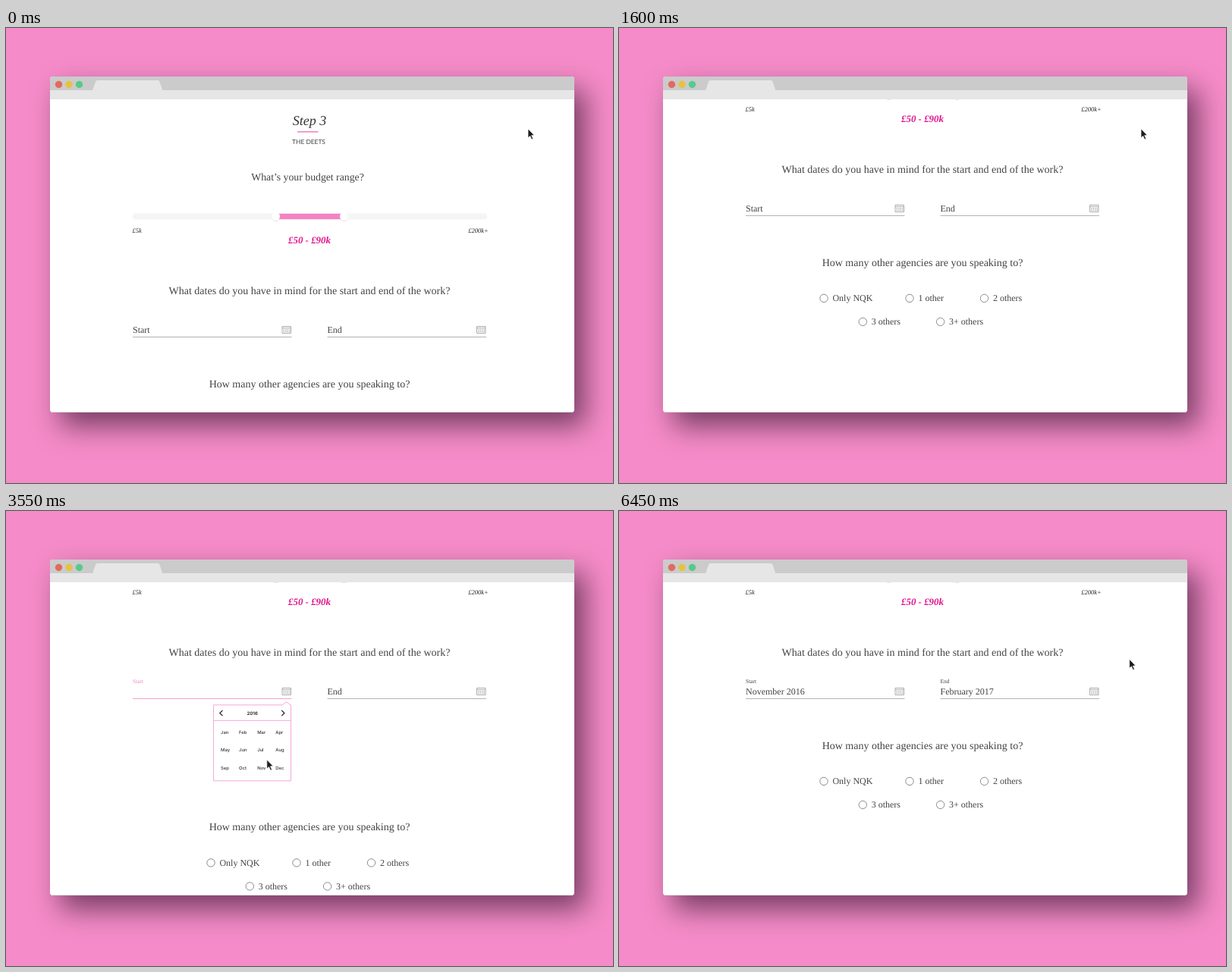
Animation of 800x600 px, one loop 7950 ms. Source, as an HTML page:

```html
<!DOCTYPE html>
<html lang="en">
<head>
<meta charset="utf-8">
<title>Budget and dates form</title>
<style>
  html, body { margin: 0; width: 100%; height: 100%; overflow: hidden; background: #f58bc8; }
  .window {
    position: absolute; left: 58px; top: 64px; width: 691px; height: 443px;
    border-radius: 4px; background: #fff;
    box-shadow: 14px 18px 36px rgba(20, 0, 20, .56);
  }
  svg { position: absolute; left: 0; top: 0; }
  text { font-family: "Liberation Serif", serif; fill: #444; text-rendering: geometricPrecision; }
  .mid { text-anchor: middle; }
  .step { font-size: 18px; font-style: italic; fill: #333; }
  .sub { font: 8.4px Lato, sans-serif; }
  .ask { font-size: 14px; }
  .item { font-size: 12px; }
  .label { font-size: 7.5px; }
  .limit { font-size: 8.5px; font-style: italic; fill: #222; }
  .range { font-size: 12.9px; font-style: italic; font-weight: bold; fill: #e2128c; }
  .month { font: 500 5.9px Inter, sans-serif; fill: #333; }
  .year { font: 700 6.1px Inter, sans-serif; fill: #333; }
  .rule { stroke: #b3b3b3; }
  .active .rule { stroke: #f3a0d0; }
  .active .label { fill: #f284c4; }
  .picker { fill: #fff; stroke: #f3a9d4; }
  .chevron { fill: none; stroke: #222; stroke-width: 1.2; }
  .icon { fill: none; stroke: #a3a3a3; stroke-width: .9; }
</style>
</head>
<body>
<div class="window"></div>
<svg width="800" height="600" viewBox="0 0 800 600">
  <defs>
    <clipPath id="view"><rect x="58" y="94" width="691" height="412"/></clipPath>
    <filter id="soft" x="-50%" y="-50%" width="200%" height="200%">
      <feDropShadow dx="0" dy=".5" stdDeviation=".7" flood-opacity=".22"/>
    </filter>
  </defs>

  <path d="M58 82V68a4 4 0 0 1 4-4H745a4 4 0 0 1 4 4V82Z" fill="#cbcbcb"/>
  <rect x="58" y="82" width="691" height="12" fill="#e6e6e6"/>
  <path d="M114 82.5L118 71Q118.600 69 120.500 69H200Q202 69 202.600 71L206.500 82.5Z" fill="#e6e6e6"/>
  <circle cx="69.500" cy="74.500" r="4.700" fill="#e26a5f"/>
  <circle cx="83" cy="74.500" r="4.700" fill="#e5c242"/>
  <circle cx="96.500" cy="74.500" r="4.700" fill="#58c98b"/>
  <path d="M61 506.500H746" stroke="#dedede"/>

  <g clip-path="url(#view)">
    <g id="page">
      <text class="step mid" x="400" y="127.500">Step 3</text>
      <rect x="384" y="136" width="27.500" height="1.700" fill="#f38cc6"/>
      <text class="sub mid" x="399" y="153">THE DEETS</text>
      <text class="ask mid" x="397.500" y="200.500" style="font-size:13.75px">What’s your budget range?</text>

      <rect x="167" y="244.500" width="467" height="8" rx="3.500" fill="#f5f5f5"/>
      <rect x="356" y="244.800" width="90" height="7.400" fill="#f284c4"/>
      <g fill="#fff" filter="url(#soft)">
        <circle cx="355.500" cy="248.500" r="5.500"/>
        <circle cx="445.500" cy="248.500" r="5.500"/>
      </g>
      <text class="limit" x="166.500" y="269.800">£5k</text>
      <text class="limit" x="635.700" y="269.800" text-anchor="end">£200k+</text>
      <text class="range mid" x="400" y="284.300">£50 - £90k</text>

      <text class="ask mid" x="400" y="350.500">What dates do you have in mind for the start and end of the work?</text>
      <g id="fields"></g>
      <g id="lower">
        <text class="ask mid" x="400" y="473.500">How many other agencies are you speaking to?</text>
      </g>
    </g>
    <g id="pickers"></g>
  </g>
  <g id="cursor">
    <path id="arrow" fill="#1c1c1c" stroke="#fff" stroke-width=".7"
      d="M0 0V11.800L2.700 9.400L4.800 14L6.700 13.200L4.700 8.700L8.200 8.400Z"/>
    <g id="hand" transform="translate(-4.200 -.7)" stroke="#111" stroke-linejoin="round">
      <path fill="#fff" stroke-width="1.100" d="M3.200 1.600C3.200.4 5.400.4 5.400 1.600V5.500Q6.600 4.800 7.400 5.800Q8.600 5.200 9.400 6.200Q11 5.800 11.400 7.500V9.600Q11.200 11 10.300 12.200V14H4.600V12.600Q3 11 1 8.200Q.4 7 1.400 6.700Q2.400 6.800 3.200 8Z"/>
      <path stroke-width=".7" d="M5.900 9V11.500M7.500 9V11.500M9.100 9V11.500"/>
    </g>
  </g>
</svg>
<script>
  const LOOP = 7950, OPEN_SHIFT = 107.5;
  const NS = "http://www.w3.org/2000/svg";
  const $ = id => document.getElementById(id);

  function add(parent, tag, attrs, text) {
    const el = document.createElementNS(NS, tag);
    for (const key in attrs) el.setAttribute(key, attrs[key]);
    if (text) el.textContent = text;
    parent.append(el);
    return el;
  }
  const show = (el, on) => el.setAttribute("visibility", on ? "visible" : "hidden");

  function makeField(x, name, value) {
    const g = add($("fields"), "g", { transform: `translate(${x} 0)` });
    add(g, "path", { class: "rule", d: "M0 407.5H209.5" });
    add(g, "path", { class: "icon", d: "M197 393.500H208.500V402.500H197ZM197 395.700H208.500" });
    add(g, "path", { class: "icon", d: "M198.700 398.100H207.300M198.700 400.400H207.300",
      "stroke-dasharray": "1.400 1", style: "stroke-width:1.3" });
    return {
      g,
      empty: add(g, "text", { class: "item", x: 0, y: 402.4 }, name),
      label: add(g, "text", { class: "label", x: 0, y: 387.4 }, name),
      value: add(g, "text", { class: "item", x: 0, y: 402.4 }, value)
    };
  }

  function setField(field, state) {
    field.g.setAttribute("class", state === "active" ? "active" : "");
    show(field.empty, state === "empty");
    show(field.label, state !== "empty");
    show(field.value, state === "filled");
  }

  const MONTHS = "Jan Feb Mar Apr May Jun Jul Aug Sep Oct Nov Dec".split(" ");

  function makePicker(x, y, year, pick) {
    const g = add($("pickers"), "g", { transform: `translate(${x} ${y})` });
    add(g, "path", { class: "picker", d: "M0 0H90.500L96 -4L101.500 0H102V100H0Z" });
    add(g, "path", { class: "picker", d: "M0 20.500H102" });
    add(g, "path", { class: "chevron", d: "M12 7L8.300 10.700L12 14.400M89.700 7L93.400 10.700L89.700 14.400" });
    add(g, "text", { class: "year mid", x: 51.2, y: 13.4 }, year);
    const place = i => [9.5 + i % 4 * 24.1, 38.2 + (i >> 2) * 23.3];
    const [px, py] = place(pick);
    const spot = add(g, "circle", { cx: px + 5.3, cy: py - 2, r: 9.6, fill: "#f284c4" });
    const names = MONTHS.map((month, i) => {
      const [mx, my] = place(i);
      return add(g, "text", { class: "month", x: mx, y: my }, month);
    });
    return (open, hover) => {
      g.style.display = open ? "" : "none";
      show(spot, hover);
      names[pick].style.fill = hover ? "#fff" : "";
    };
  }

  function makeRadio(x, y, name) {
    add($("lower"), "circle", { cx: x, cy: y, r: 5.2, fill: "#fff", stroke: "#8c8c8c" });
    add($("lower"), "text", { class: "item", x: x + 11.4, y: y + 4 }, name);
  }

  const start = makeField(167, "Start", "November 2016");
  const end = makeField(423.5, "End", "February 2017");
  const startPicker = makePicker(273.5, 255.8, "2016", 10);
  const endPicker = makePicker(530, 255.3, "2017", 1);
  makeRadio(270, 516.4, "Only NQK");
  makeRadio(383, 516.4, "1 other");
  makeRadio(481.5, 516.4, "2 others");
  makeRadio(321.3, 547.4, "3 others");
  makeRadio(423.6, 547.4, "3+ others");

  // time, scroll offset
  const SCROLL = [[0, 0], [1000, 42.5], [1200, 90.5], [1400, 133], [1600, 160]];
  // time, tip x, tip y, hand
  const CURSOR = [
    [0, 688, 133], [2100, 369, 236, 1], [2450, 346.5, 243.5], [2650, 387, 316],
    [3550, 343.8, 328], [4050, 335.6, 335, 1], [4550, 389.5, 335.5],
    [4750, 455, 308], [4850, 535, 292.5], [4950, 605, 324.5],
    [5450, 589, 308], [5550, 566.9, 288.2, 1],
    [6150, 606, 266], [6250, 647.5, 226.5], [6450, 672.7, 195.5]
  ];
  const at = (table, t) => table.findLast(row => row[0] <= t);
  const ease = p => p * p * (3 - 2 * p);

  function cursorAt(t) {
    if (t < 1600 || t >= 2100) return at(CURSOR, t);
    const p = ease(Math.floor((t - 1600) / 50) / 10);
    return [t, 688 - 319 * p, 133 + 103 * p];
  }

  function draw(t) {
    const open = t >= 2450 && t < 6150;
    $("page").setAttribute("transform", `translate(0 ${-at(SCROLL, t)[1]})`);
    $("lower").setAttribute("transform", `translate(0 ${open ? OPEN_SHIFT : 0})`);
    setField(start, t < 2450 ? "empty" : t < 4550 ? "active" : "filled");
    setField(end, t < 4550 ? "empty" : t < 6150 ? "active" : "filled");
    startPicker(open && t < 4550, t >= 4050 && t < 4550);
    endPicker(open && t >= 4550, t >= 5550 && t < 6150);
    const [, x, y, hand] = cursorAt(t);
    $("cursor").setAttribute("transform", `translate(${x} ${y})`);
    show($("arrow"), !hand);
    show($("hand"), !!hand);
  }

  const origin = performance.now();
  function tick() {
    draw((performance.now() - origin) % LOOP);
    requestAnimationFrame(tick);
  }
  tick();
</script>
</body>
</html>
```
